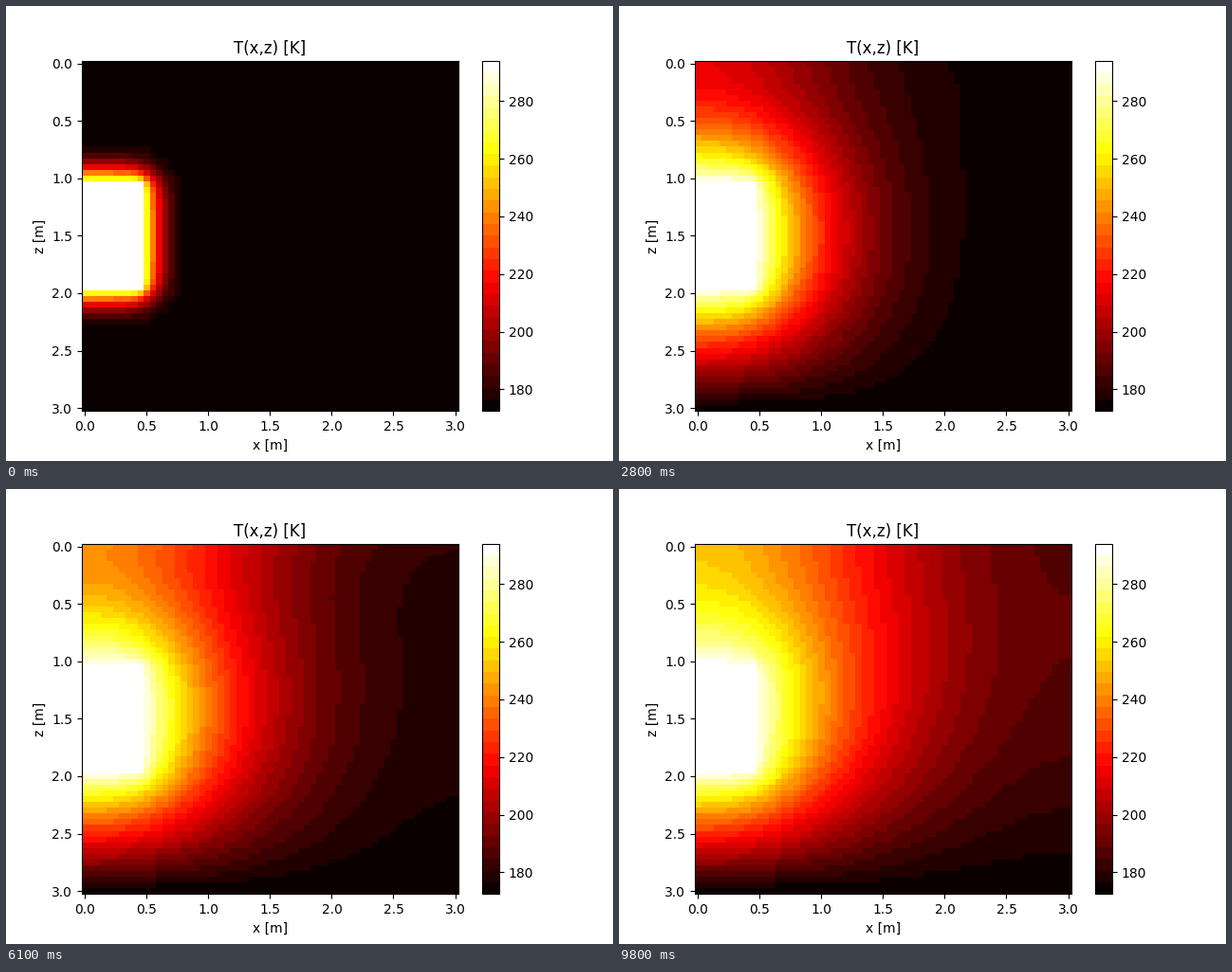
Recreate the animation shown at these times as a matplotlib script. Size 640 by 480 pixels, loop 9900 ms.

```python
import math

import numpy as np
import matplotlib.pyplot as plt
from matplotlib.animation import FuncAnimation

N = 61                  # grid nodes per side, 0.05 m apart
FRAMES = 99
SUBSTEPS = 26
DIFFUSION = 5.2         # squared cells per frame
GROUND, HEATER = 172.5, 294.0
PERIOD = 52             # surface forcing cycle, in frames
HOT = (slice(21, 40), slice(0, 10))


def surface_gradient(t):
    """Heat entering through the surface, in kelvin per cell."""
    return 0.04 + 0.38 * math.cos(2 * math.pi * (t - 9) / PERIOD)


def diffuse(temp, t):
    """One explicit step: insulated sides, forced surface, cold floor."""
    p = np.pad(temp, 1, mode="reflect")
    p[0] += 2 * surface_gradient(t)
    lap = p[:-2, 1:-1] + p[2:, 1:-1] + p[1:-1, :-2] + p[1:-1, 2:] - 4 * temp
    temp = temp + DIFFUSION / SUBSTEPS * lap
    temp[-1] = GROUND
    temp[HOT] = HEATER
    return temp


def simulate():
    temp = np.full((N, N), GROUND)
    temp[HOT] = HEATER
    history = []
    for frame in range(FRAMES):
        for step in range(SUBSTEPS):
            temp = diffuse(temp, frame - 1 + step / SUBSTEPS)
        history.append(temp)
    return history


history = simulate()
axis = np.linspace(0, 3, N)

fig, ax = plt.subplots(figsize=(6.4, 4.8), dpi=100)
mesh = ax.pcolormesh(axis, axis, history[0], shading="nearest",
                     cmap=plt.get_cmap("hot", 30))
ax.invert_yaxis()
ax.set_title("T(x,z) [K]")
ax.set_xlabel("x [m]")
ax.set_ylabel("z [m]")
fig.colorbar(mesh, ax=ax)


def update(frame):
    temp = history[frame]
    mesh.set_array(temp)
    mesh.set_clim(temp.min(), temp.max())
    return [mesh]


anim = FuncAnimation(fig, update, frames=FRAMES, interval=100, repeat=True)
plt.show()
```
